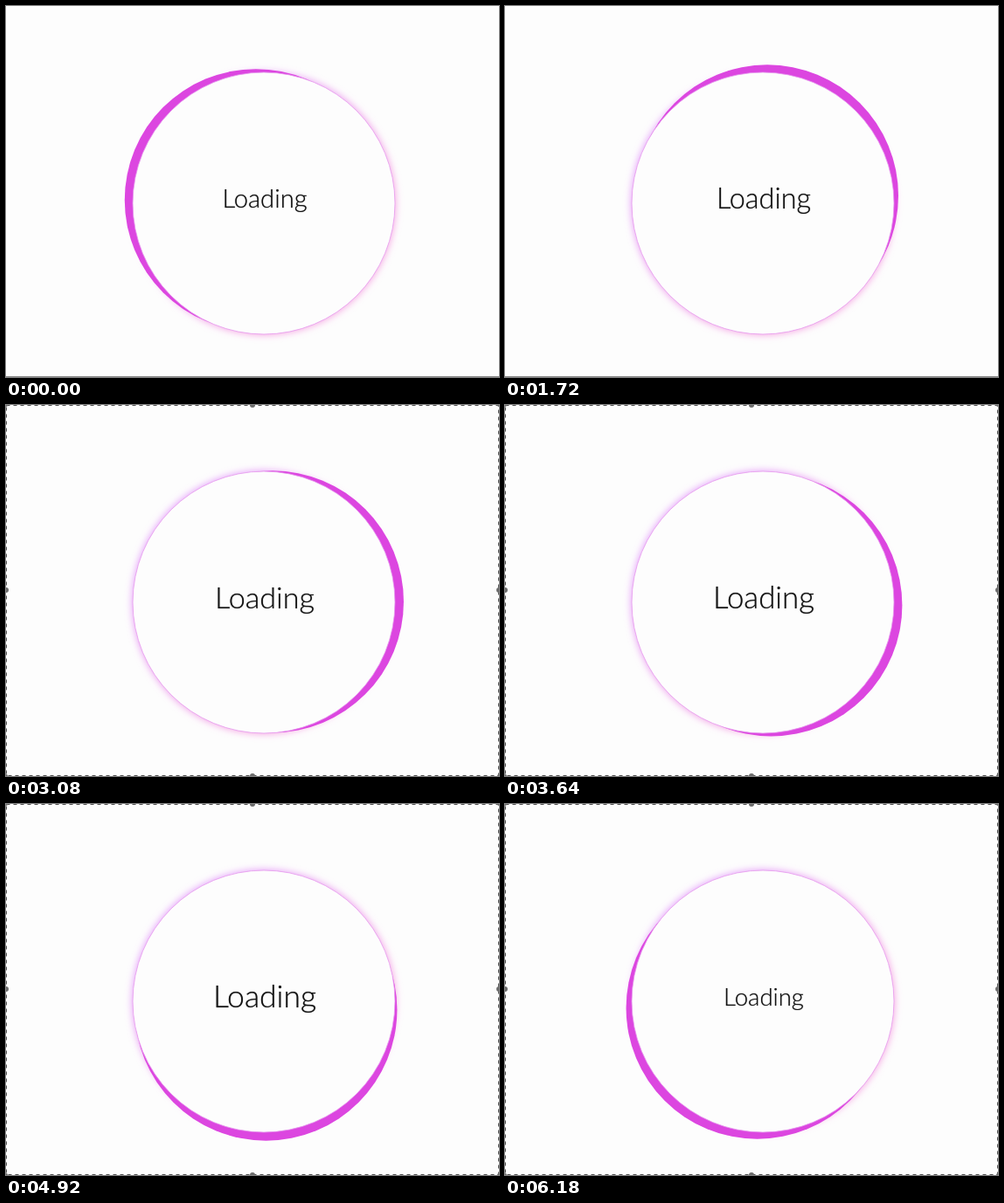
These frames come from a looping animation (564x425 px, 6200 ms). An HTML page:

```html
<!DOCTYPE html>
<html lang="en">
<head>
<meta charset="utf-8">
<title>Loading</title>
<style>
  html, body { margin: 0; height: 100%; overflow: hidden; background: #fdfdfd; }
  svg { display: block; width: 564px; height: 425px; }
  text {
    font-family: Papyrus, Lato, sans-serif;
    font-weight: 300;
    fill: #111;
    text-anchor: middle;
    text-shadow: 0 0 1px #555;
  }
</style>
</head>
<body>
<svg viewBox="0 0 564 425">
  <defs>
    <linearGradient id="tint" x1="0" y1="0" x2="1" y2="1">
      <stop offset=".2" stop-color="#e296fa"/>
      <stop offset=".7" stop-color="#f59ce0"/>
    </linearGradient>
    <filter id="soft"><feGaussianBlur stdDeviation="4.5"/></filter>
  </defs>
  <circle cx="295" cy="226" r="150.5" fill="url(#tint)" filter="url(#soft)"/>
  <circle id="crescent" cx="295" cy="226" r="150" fill="#dc46e0"/>
  <circle cx="295" cy="226" r="150" fill="#fdfdfd" stroke="#e69aee" stroke-width=".8"/>
  <text id="label" x="296">Loading</text>
  <path id="baseline" d="M0 424.5H564" stroke="#8c8c8c"/>
  <g id="selection">
    <rect x=".5" y=".5" width="563" height="424" fill="none" stroke="#555" stroke-dasharray="4 4"/>
    <g fill="#6c6c6c">
      <circle cx="282" cy="0" r="3"/><circle cx="282" cy="425" r="3"/>
      <circle cx="0" cy="212" r="3"/><circle cx="564" cy="212" r="3"/>
      <circle cx="0" cy="0" r="2"/><circle cx="564" cy="0" r="2"/>
      <circle cx="0" cy="425" r="2"/><circle cx="564" cy="425" r="2"/>
    </g>
  </g>
</svg>
<script>
const LOOP = 6200, SELECT_AT = 2820;
const $ = id => document.getElementById(id);
const crescent = $('crescent'), label = $('label');
const selection = $('selection'), baseline = $('baseline');

// Crescent direction in degrees; it advances in uneven ticks.
function angleAt(t) {
  if (t < 460) return 202.5 + 6.25 * Math.min(5, Math.floor((t + 40) / 60));
  if (t < 1020) return 240 + 2 * Math.floor((t - 460) / 37.34);
  // Three ticks per 140 ms: two short, one long.
  const ticks = 3 * Math.floor(t / 140) + Math.min(2, Math.floor(t % 140 / 20));
  return 270 + 2 * (ticks - 23);
}

function draw(t) {
  const angle = angleAt(t), rad = angle * Math.PI / 180;
  crescent.setAttribute('transform', `translate(${10 * Math.cos(rad)} ${10 * Math.sin(rad)})`);

  // The label swells once per turn, starting when the crescent is at the bottom.
  const turn = (angle - 90) % 360 / 360;
  const size = 27.3 + 8.2 * (1 - Math.cos(Math.PI * turn)) / 2;
  label.style.fontSize = size + 'px';
  label.setAttribute('y', 223.5 + 0.27 * size);

  const selected = t >= SELECT_AT;
  selection.style.display = selected ? '' : 'none';
  baseline.style.display = selected ? 'none' : '';
}

const start = performance.now();
function tick() {
  draw((performance.now() - start) % LOOP);
  requestAnimationFrame(tick);
}
tick();
</script>
</body>
</html>
```
